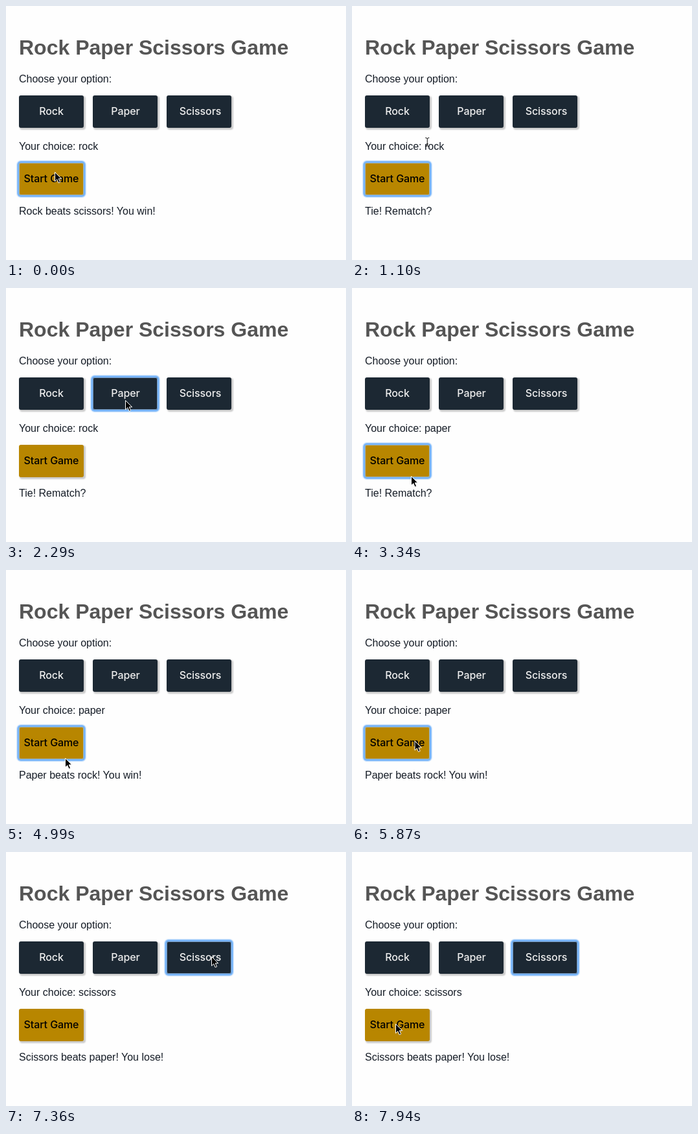
An HTML page for the animation above (8000 ms loop, 525 by 392 pixels).

```html
<!DOCTYPE html>
<html lang="en">
<head>
<meta charset="utf-8">
<title>Rock Paper Scissors Game</title>
<style>
  html, body { margin: 0; width: 100%; height: 100%; overflow: hidden; background: #fefefe; }
  body { position: relative; color: #151c26; font: 16px/20px "Liberation Sans", Arial, sans-serif; }
  h1, p, button, svg { position: absolute; margin: 0; white-space: pre; }
  h1 { left: 20px; top: 44px; font-size: 32px; line-height: 40px; color: #555; }
  p { left: 20px; }
  button {
    top: 138px; width: 100px; height: 50px; padding: 0 0 2px; border: 0; border-radius: 3px;
    background: #1c2833; color: #eee; font: 500 16px/48px Inter, sans-serif; letter-spacing: -.1px;
    box-shadow: 2px 2px 2px 1px rgba(0, 0, 0, .2); outline: none;
  }
  #rock { left: 20px; }
  #paper { left: 134px; text-indent: 1px; }
  #scissors { left: 248px; text-indent: 4px; }
  #start { left: 20px; top: 242px; background: #b88600; color: #000; }
  button.focus {
    box-shadow: inset 0 0 0 1px rgba(150, 195, 245, .7), 0 0 0 1px #7db6f7,
      0 0 0 2px #6eaff8, 0 0 0 3px #97c7fb, 0 0 1px 4px #d4e7fd;
  }
  svg { left: 0; top: 0; overflow: visible; pointer-events: none; }
</style>
</head>
<body>
<h1>Rock Paper Scissors Game</h1>
<p style="top:103px">Choose your option:</p>
<button id="rock">Rock</button>
<button id="paper">Paper</button>
<button id="scissors">Scissors</button>
<p id="choice" style="top:207px"></p>
<button id="start">Start Game</button>
<p id="result" style="top:307px"></p>
<svg id="cursor" width="20" height="20">
  <path id="arrow" d="M0 0V14.2L3.3 11.1L5.6 16.5L8.1 15.4L5.8 10.2H10.2Z" fill="#000" stroke="#fff"/>
  <path id="beam" d="M-3 -6.5Q0 -6.5 0 -4.5Q0 -6.5 3 -6.5M0 -4.5V5M-3 7Q0 7 0 5Q0 7 3 7M-1.5 3H1.5" fill="none" stroke="#111"/>
</svg>
<script>
const LOOP = 8000;
const TICK = 145; // ms between pointer positions
const $ = id => document.getElementById(id);

const initial = { focus: "start", choice: "rock", result: "Rock beats scissors! You win!" };
const events = [
  { at: 500, result: "Tie! Rematch?" },
  { at: 2290, focus: "paper" },
  { at: 2440, choice: "paper" },
  { at: 3340, focus: "start" },
  { at: 4990, result: "Paper beats rock! You win!" },
  { at: 6170, result: "Scissors beats paper! You lose!" },
  { at: 7210, focus: "scissors" },
  { at: 7360, choice: "scissors" }
];

const home = { x: 75.5, y: 256.5 };
const moves = [
  { at: 1100, ticks: 5, x: 184.5, y: 173.5 },
  { at: 2740, ticks: 2, x: 91.5, y: 290.5 },
  { at: 5430, ticks: 2, x: 276, y: 154.5 },
  { at: 5720, ticks: 2, x: 97, y: 264 },
  { at: 6770, ticks: 3, x: 326, y: 133.5 },
  { at: 7210, ticks: 1, x: 317.5, y: 161.5 },
  { at: 7650, ticks: 3, x: 67.5, y: 265.5 }
];

const easeOut = (p, power) => 1 - (1 - p) ** power;
const mix = (a, b, k) => a + (b - a) * k;

// The pointer moves in whole ticks along arcs: y settles sooner than x.
function pointer(t) {
  let { x, y } = home;
  for (const m of moves) {
    if (t < m.at) break;
    const p = Math.min(1, (Math.floor((t - m.at) / TICK) + 1) / m.ticks);
    x = mix(x, m.x, easeOut(p, 2.1));
    y = mix(y, m.y, easeOut(p, 3.7));
  }
  return { x, y };
}

const overText = ({ x, y }) => x < 145 && y > 203 && y < 222;

function draw(t) {
  const state = Object.assign({}, initial, ...events.filter(e => e.at <= t));
  $("result").textContent = state.result;
  $("choice").textContent = "Your choice: " + state.choice;
  for (const b of document.querySelectorAll("button")) b.classList.toggle("focus", b.id === state.focus);

  const pos = pointer(t);
  const shape = overText(pos) ? "beam" : "arrow";
  $("cursor").style.transform = `translate(${pos.x}px, ${pos.y}px)`;
  for (const id of ["arrow", "beam"]) $(id).style.display = id === shape ? "" : "none";
}

const origin = performance.now();
function tick() {
  draw((performance.now() - origin) % LOOP);
  requestAnimationFrame(tick);
}
tick();
</script>
</body>
</html>
```
